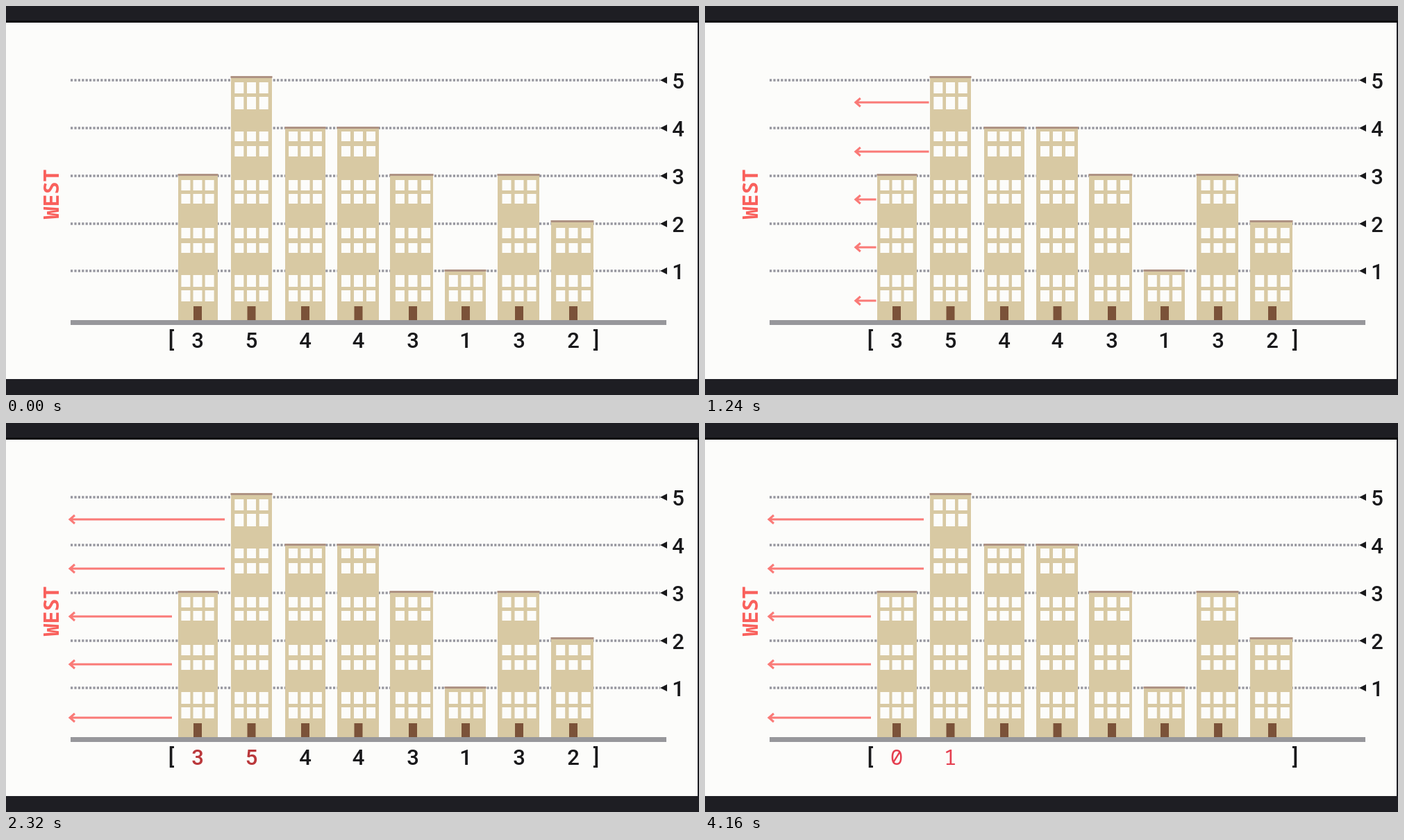
These frames come from a looping animation (998 px wide and 561 px high, 4200 ms). An HTML page with a canvas:

```html
<!DOCTYPE html>
<html lang="en">
<head>
<meta charset="utf-8">
<title>Sunset view</title>
<style>
  html, body { margin: 0; width: 100%; height: 100%; overflow: hidden; background: #1e1e23; }
  canvas { display: block; }
</style>
</head>
<body>
<canvas id="stage" width="998" height="561"></canvas>
<script>
const ctx = document.getElementById('stage').getContext('2d');
const LOOP = 4200, STEP = 40;
const PAPER = '#fcfcfa', INK = '#19191b', RED = '#f9605c';
const SANS = '500 31px Roboto, sans-serif';
const MONO = '500 31px "Noto Sans Mono", monospace';
const MONO_BOLD = '600 30px "Noto Sans Mono", monospace';

// left, right, door centre, floors
const buildings = [
  [248, 305, 276, 3], [324, 383, 353.5, 5], [402, 460, 431, 4], [477, 537, 507.5, 4],
  [553, 615, 586, 3], [632, 691, 662, 1], [708, 768, 739, 3], [785, 846, 817, 2]
];
const roofs = [0, 380, 309, 242, 174, 101];
const levels = [382, 314, 245, 176, 107];
// top and height of the two window rows on each floor
const windowRows = [
  [388, 17, 410, 16], [320, 15, 342, 14], [251, 15, 271, 14], [181, 14, 202, 15], [110, 16, 131, 18]
];
const arrowRows = [425, 348, 279, 210, 139];

const ramp = (t, from, to) => Math.min(1, Math.max(0, (t - from) / (to - from)));

function rect(x, y, w, h, color) {
  ctx.fillStyle = color;
  ctx.fillRect(x, y, w, h);
}

function text(s, x, y, color = INK, font = SANS) {
  ctx.font = font;
  ctx.fillStyle = color;
  ctx.fillText(s, x, y);
}

function drawScale() {
  levels.forEach((y, i) => {
    ctx.strokeStyle = '#97979f';
    ctx.lineWidth = 3.4;
    ctx.setLineDash([3.2, 2.2]);
    ctx.beginPath();
    ctx.moveTo(93, y);
    ctx.lineTo(942, y);
    ctx.stroke();
    ctx.setLineDash([]);
    ctx.fillStyle = INK;
    ctx.beginPath();
    ctx.moveTo(942, y);
    ctx.lineTo(952, y - 5);
    ctx.lineTo(952, y + 5);
    ctx.fill();
    text(i + 1, 968, y + 11.5);
  });
}

function drawArrow(tip, tail, y) {
  ctx.beginPath();
  ctx.moveTo(tail, y);
  ctx.lineTo(tip, y);
  ctx.moveTo(tip + 7, y - 6);
  ctx.lineTo(tip, y);
  ctx.lineTo(tip + 7, y + 6);
  ctx.stroke();
}

function drawArrows(t) {
  const u = ramp(t, 395, 2195);
  if (!u) return;
  const eased = 0.7 * u + 0.15 * (1 - Math.cos(Math.PI * u));
  const left = 233 * (1 - eased);
  ctx.strokeStyle = '#fa7a77';
  ctx.lineWidth = 3;
  arrowRows.forEach((y, i) => drawArrow(92 + left, (i < 3 ? 239 : 315) + left * 0.06, y));
}

function drawBuilding([left, right, door, floors]) {
  const top = roofs[floors], width = right - left, gap = width * 0.3;
  rect(left, top, width, 453 - top, '#d8c9a3');
  rect(left - 0.5, top, width + 1, 3, '#ae9283');
  for (const [y1, h1, y2, h2] of windowRows.slice(0, floors)) {
    for (let i = -1; i <= 1; i++) {
      const x = door + i * gap - 6.5;
      rect(x, y1, 13, h1, PAPER);
      rect(x, y2, 13, h2, PAPER);
    }
  }
  rect(door - 6, 433, 12, 20, '#7b5239');
}

function drawBrackets() {
  text('[', 238, 492);
  text(']', 850, 492);
}

function drawArray(t) {
  const k = ramp(t, 2140, 2380);
  const mix = (a, b) => Math.round(a + (b - a) * k);
  const seen = `rgb(${mix(25, 240)}, ${mix(25, 66)}, ${mix(27, 70)})`;
  ctx.globalAlpha = 1 - ramp(t, 3320, 3630);
  drawBrackets();
  buildings.forEach(([, , x, floors], i) => text(floors, x, 493, i < 2 ? seen : INK));

  ctx.globalAlpha = ramp(t, 3460, 3760);
  drawBrackets();
  text('0', 276, 493, '#e53f50', MONO);
  text('1', 353, 493, '#e53f50', MONO);
  ctx.globalAlpha = 1;
}

function draw(now) {
  const t = Math.floor(now % LOOP / STEP) * STEP;
  ctx.textAlign = 'center';
  rect(0, 0, 998, 561, '#1e1e23');
  rect(0, 21, 998, 3, '#0c0c0e');
  rect(0, 24, 996, 514, PAPER);
  drawScale();
  drawArrows(t);
  buildings.forEach(drawBuilding);
  rect(93, 453, 858, 7, '#97979b');

  ctx.save();
  ctx.translate(76, 271.5);
  ctx.rotate(-Math.PI / 2);
  text('WEST', 0, 0, RED, MONO_BOLD);
  ctx.restore();

  drawArray(t);
}

const start = performance.now();
function tick() {
  draw(performance.now() - start);
  requestAnimationFrame(tick);
}
tick();
</script>
</body>
</html>
```
